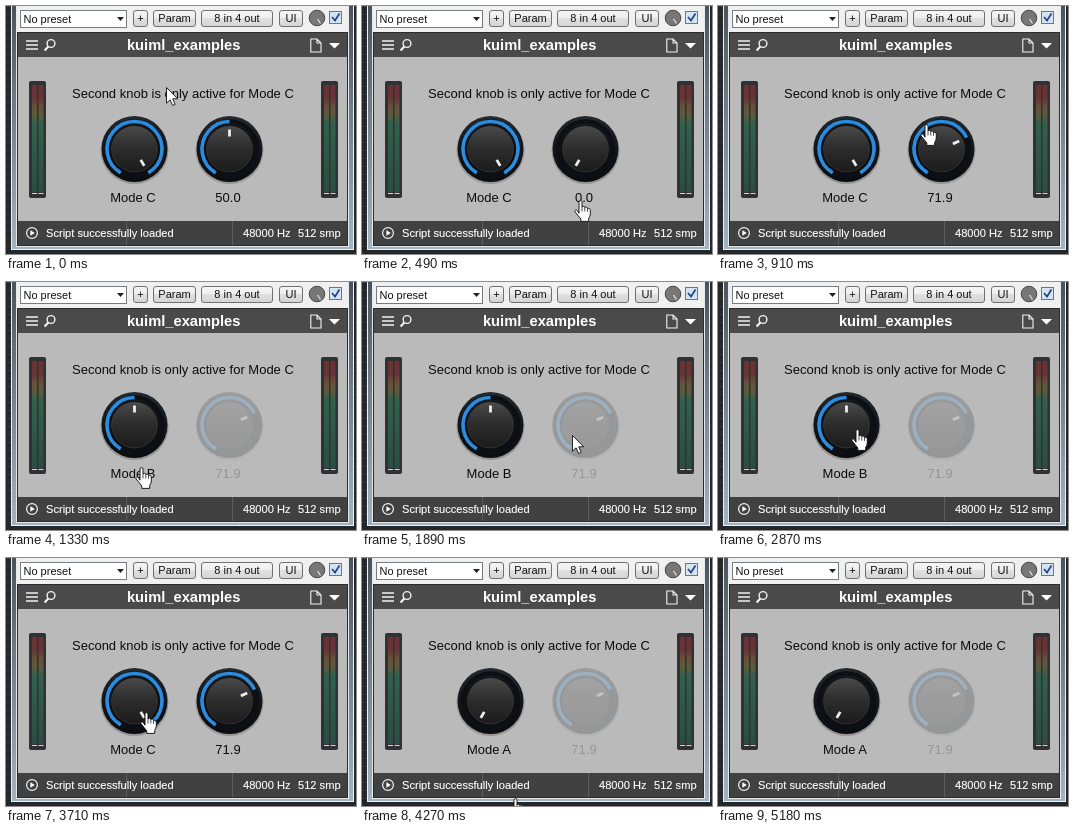
An HTML page that plays this animation: 350 px wide and 248 px high, repeating every 5.25 s.

```html
<!DOCTYPE html>
<html lang="en">
<head>
<meta charset="utf-8">
<title>Knob modes</title>
<style>
html, body { margin: 0; width: 100%; height: 100%; overflow: hidden; background: #24272a; }
svg { display: block; width: 100vw; height: 100vh; }
text { font-family: "Liberation Sans", Arial, sans-serif; }
.host { font-size: 11px; fill: #111; }
.body { font-size: 13px; fill: #0c0c0c; }
.status { font-size: 11.1px; fill: #fff; stroke: #fff; stroke-width: .15; }
.mid { text-anchor: middle; }
</style>
</head>
<body>
<svg viewBox="0 0 350 248">
  <defs>
    <linearGradient id="btn" x2="0" y2="1">
      <stop stop-color="#f6f6f6"/><stop offset=".5" stop-color="#ededed"/>
      <stop offset=".5" stop-color="#e0e0e0"/><stop offset="1" stop-color="#d4d4d4"/>
    </linearGradient>
    <linearGradient id="frame" x2="0" y2="1">
      <stop stop-color="#4a535c"/><stop offset="1" stop-color="#a3b4c1"/>
    </linearGradient>
    <linearGradient id="bars" x2="0" y2="1">
      <stop stop-color="#6b3133"/><stop offset=".12" stop-color="#673435"/>
      <stop offset=".2" stop-color="#66503a"/><stop offset=".28" stop-color="#5c5a3c"/>
      <stop offset=".36" stop-color="#33604c"/><stop offset="1" stop-color="#2b4d42"/>
    </linearGradient>
    <linearGradient id="rim" x2="0" y2="1">
      <stop stop-color="#24292d"/><stop offset=".5" stop-color="#12161a"/><stop offset="1" stop-color="#0a0c0e"/>
    </linearGradient>
    <linearGradient id="cap" x2="0" y2="1">
      <stop stop-color="#4a4a4a"/><stop offset=".45" stop-color="#2e2e2e"/><stop offset="1" stop-color="#1b1b1b"/>
    </linearGradient>
    <pattern id="rows" width="10" height="8" patternUnits="userSpaceOnUse">
      <rect width="10" height="8" fill="#24272a"/><rect width="10" height="1" fill="#33373b"/>
    </pattern>
    <g id="meter">
      <rect width="17" height="117" rx="2" fill="#2f3132"/>
      <rect x="3" y="4" width="5" height="107" fill="url(#bars)"/>
      <rect x="9.5" y="4" width="5" height="107" fill="url(#bars)"/>
      <path d="M3 112.5h5M9.5 112.5h5" stroke="#d5dcd8"/>
    </g>
    <g id="arrow">
      <path d="M.5 .5V16.2L4.1 12.8 6.7 18.5 9.2 17.4 6.7 11.8H11.6Z" fill="#fff" stroke="#111" stroke-width=".9"/>
    </g>
    <g id="hand">
      <path d="M5 13.2V2.2Q5 .6 6.5 .6 8 .6 8 2.2V7.2Q8.3 6.2 9.4 6.3 10.7 6.4 10.8 7.7 11.3 6.9 12.3 7.1 13.4 7.3 13.5 8.6 14.2 8 15.2 8.4 16.3 8.9 16.3 10.3V14Q16.2 16.5 14.7 18.3V21.4H6.8V19Q4.2 15.6 1 11.8 .5 10.6 1.6 10.1 2.8 9.7 3.7 11Z" fill="#fff" stroke="#111" stroke-width=".95"/>
      <path d="M8 7.2v4.3M10.8 7.7v3.9M13.5 8.6v3.2" stroke="#222" stroke-width=".8"/>
    </g>
  </defs>

  <!-- desktop and window frame -->
  <rect width="350" height="248" fill="url(#rows)"/>
  <rect x="5.5" y="-2" width="342" height="245.5" fill="url(#frame)" stroke="#eef3f6"/>
  <rect x="10.5" y="-2" width="332" height="242.5" fill="#2c2c2c" stroke="#e6e9ec"/>

  <!-- host toolbar -->
  <rect x="11" width="331" height="26" fill="#f0f0f0"/>
  <rect x="14.5" y="4.5" width="106" height="17" fill="#fff" stroke="#777c83"/>
  <path d="M111 11h7l-3.5 4Z" fill="#222"/>
  <text class="host" x="17.5" y="17">No preset</text>
  <g id="buttons"></g>
  <circle cx="311" cy="12" r="7.8" fill="#777" stroke="#4a4a4a"/>
  <path d="M311.5 13l3 4.5" stroke="#ddd" stroke-width="1.3"/>
  <rect x="323.5" y="5.5" width="12" height="12" fill="#d5e4f1" stroke="#5d7b98"/>
  <path d="M326 11l3 3.5 4.5-7" fill="none" stroke="#24418c" stroke-width="1.7"/>

  <!-- plugin panel -->
  <rect x="12" y="27" width="329" height="24" fill="#4a4a4a"/>
  <path d="M20 35h12M20 39h12M20 43h12" stroke="#f2f2f2" stroke-width="1.6"/>
  <circle cx="45" cy="37.5" r="3.9" fill="none" stroke="#f2f2f2" stroke-width="1.4"/>
  <path d="M42.3 40.5L38.6 44.4" stroke="#f2f2f2" stroke-width="2.2"/>
  <text class="mid" x="177.7" y="44" font-size="14.7" font-weight="bold" fill="#fff">kuiml_examples</text>
  <path d="M304.8 33h6.2l4 4v9h-10.2ZM311 33v4h4" fill="none" stroke="#f2f2f2" stroke-width="1.1"/>
  <path d="M323 37h11l-5.5 5.5Z" fill="#fff"/>
  <rect x="12" y="51" width="329" height="164" fill="#bababa"/>
  <use href="#meter" x="23" y="75"/>
  <use href="#meter" x="315" y="75"/>
  <text class="body" x="66" y="92">Second knob is only active for Mode C</text>
  <g id="knobs"></g>

  <!-- status bar -->
  <rect x="12" y="215" width="329" height="24" fill="#414141"/>
  <path d="M120.5 215v24M226.5 215v24" stroke="#5e5e5e"/>
  <circle cx="26" cy="227" r="5.4" fill="none" stroke="#f2f2f2" stroke-width="1.2"/>
  <path d="M24.4 224.2v5.6l4.4-2.8Z" fill="#fff"/>
  <text class="status" x="40" y="231">Script successfully loaded</text>
  <text class="status" x="237" y="231">48000 Hz</text>
  <text class="status" x="292" y="231">512 smp</text>

  <use id="cursor"/>
</svg>
<script>
const LOOP = 5250, STEP = 70;
const $ = id => document.getElementById(id);
const clamp = (v, lo, hi) => Math.min(hi, Math.max(lo, v));

// Pointer path: time, left, top
const path = [
  [0, 160, 81], [140, 215, 139], [210, 215, 139], [490, 212, 194], [560, 211, 186],
  [840, 202, 118], [910, 202, 118], [1120, 133, 140], [1330, 129, 185], [1400, 129, 188],
  [1540, 129, 188], [1680, 165, 203], [1750, 195, 196], [1960, 218, 132], [2170, 235, 165],
  [2310, 231, 190], [2590, 186, 138], [2660, 173, 150], [2870, 133, 147], [2940, 133, 147],
  [3150, 133, 118], [3430, 133, 118], [3710, 134, 154], [3990, 141, 209], [4270, 147, 240],
  [4410, 147, 240]
];

function pointer(t) {
  const i = path.findIndex(k => k[0] > t);
  if (i < 0) return path[path.length - 1].slice(1);
  const [t0, x0, y0] = path[i - 1], [t1, x1, y1] = path[i];
  const p = (t - t0) / (t1 - t0);
  return [x0 + (x1 - x0) * p, y0 + (y1 - y0) * p].map(Math.round);
}

function modeAt(t) {
  if (t < 1260) return 2;
  if (t < 3080) return 1;
  if (t < 3850) return 2;
  return t < 4130 ? 1 : 0;
}

function levelAt(t) {
  if (t < 280) return 50;
  if (t >= 840) return 71.9;
  return clamp(50 + (139 - pointer(t)[1]) * 21.9 / 21, 0, 100);
}

function cursorAt(t) {
  const hand = (t >= 140 && t < 980) || (t >= 1050 && t < 1610) || t >= 2730;
  return hand ? "#hand" : "#arrow";
}

function addButton(x, w, label) {
  $("buttons").innerHTML +=
    `<rect x="${x + .5}" y="4.5" width="${w}" height="16" rx="2.5" fill="url(#btn)" stroke="#707070"/>
     <text class="host mid" x="${x + .5 + w / 2}" y="16">${label}</text>`;
}

function addKnob(id, x) {
  $("knobs").innerHTML += `<g id="${id}" transform="translate(${x} 143)">
    <ellipse cy="1.5" rx="34" ry="33.5" fill="#000" opacity=".2"/>
    <circle r="33" fill="url(#rim)"/>
    <circle r="27.5" fill="none" stroke="#0c1014" stroke-width="4.5"/>
    <path class="arc" d="M-13.75 23.82A27.5 27.5 0 1 1 13.75 23.82" pathLength="300"
      fill="none" stroke="#2b8ce0" stroke-width="3.6"/>
    <circle r="24.5" fill="#0b0c0d"/>
    <circle r="23" fill="url(#cap)" stroke="#444" stroke-width=".6"/>
    <path class="mark" d="M0-19.5v7" stroke="#eee" stroke-width="2.8"/>
    <text class="body mid" x="-1.5" y="53"></text>
  </g>`;
}

function setKnob(id, value, label, on) {
  const g = $(id), part = s => g.querySelector(s);
  part(".arc").setAttribute("stroke-dasharray", `${value * 300} 400`);
  part(".arc").setAttribute("visibility", value > 0 ? "visible" : "hidden");
  part(".mark").setAttribute("transform", `rotate(${value * 300 - 150})`);
  part("text").textContent = label;
  g.setAttribute("opacity", on ? 1 : .2);
}

function draw(ms) {
  const t = Math.floor(ms % LOOP / STEP) * STEP;
  const mode = modeAt(t), level = levelAt(t), [x, y] = pointer(t);
  setKnob("modeKnob", mode / 2, "Mode " + "ABC"[mode], true);
  setKnob("levelKnob", level / 100, level.toFixed(1), mode === 2);
  const c = $("cursor");
  c.setAttribute("href", cursorAt(t));
  c.setAttribute("transform", `translate(${x} ${y})`);
  c.setAttribute("visibility", t < 4410 ? "visible" : "hidden");
}

addButton(127, 14, "+");
addButton(147, 42, "Param");
addButton(195, 71, "8 in 4 out");
addButton(273, 23, "UI");
addKnob("modeKnob", 128.5);
addKnob("levelKnob", 223.5);

const start = performance.now();
function tick() {
  draw(performance.now() - start);
  requestAnimationFrame(tick);
}
tick();
</script>
</body>
</html>
```
